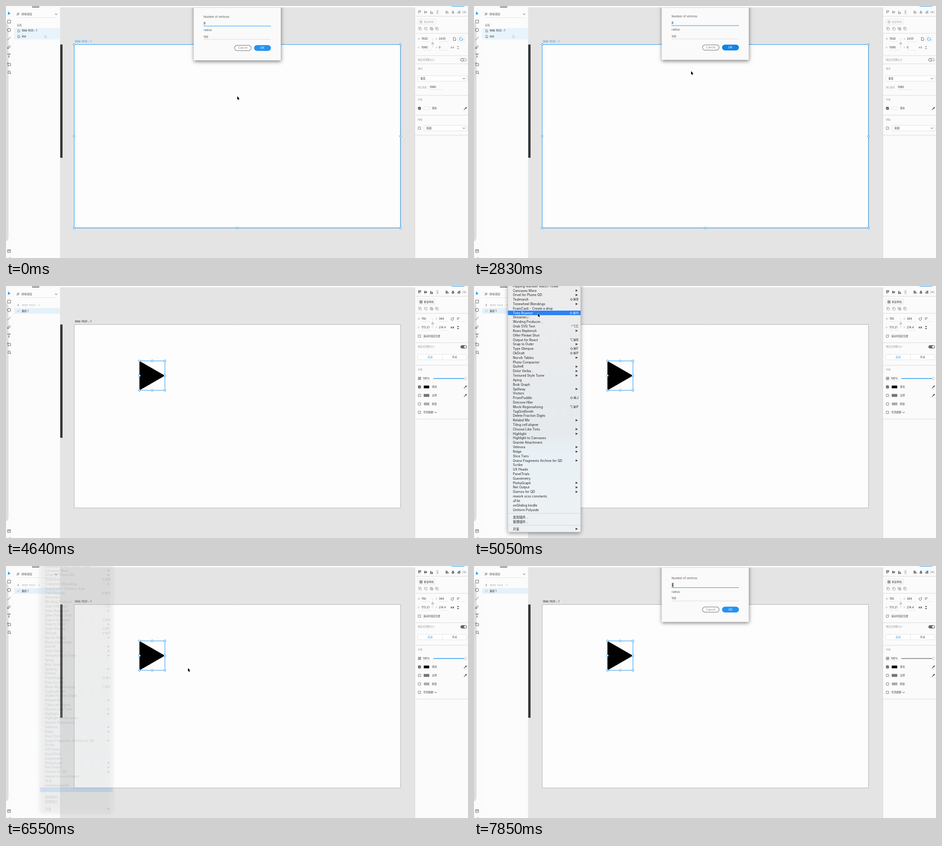
An HTML page with a canvas for the animation above (8 s loop, 1013 px wide and 553 px high).

```html
<!DOCTYPE html>
<html lang="zh">
<head>
<meta charset="utf-8">
<style>
html, body { margin: 0; width: 100%; height: 100%; background: #e4e4e4; }
canvas { display: block; width: 1013px; height: 553px; }
</style>
</head>
<body>
<canvas id="stage"></canvas>
<script>
const W = 1013, H = 553, LOOP = 8000;
const BLUE = '#2196f0', INK = '#444', SOFT = '#999', RULE = '#d6d6d6';
const FONT = 'Inter, "Noto Sans CJK SC", "Noto Sans CJK", "DejaVu Sans", sans-serif';
const canvas = document.getElementById('stage');
const ratio = window.devicePixelRatio || 1;
canvas.width = W * ratio;
canvas.height = H * ratio;
const ctx = canvas.getContext('2d');

// Artboard placement: document units to stage pixels
const BOARD = { x: 149.5, y: 84.5, w: 715.5, h: 402.5 };
const SCALE = BOARD.w / 1920;

// Each moment changes only the listed properties, as a hard cut
const MOMENTS = [
  [0, { shape: null, selected: false, drag: false, dialog: -3.5, pressed: false, tint: '#c9cdd0',
        menu: 0, row: -1, cursor: [507, 198], beam: false, slider: BLUE }],
  [180, { dialog: 0, cursor: [519, 188] }],
  [470, { cursor: [508, 165] }],
  [660, { cursor: [484, 120] }],
  [850, { cursor: [465, 90] }],
  [1040, { cursor: [460, 80] }],
  [1940, { cursor: [475, 85], tint: '#b5d8f7' }],
  [2120, { cursor: [520, 91] }],
  [2300, { cursor: [560, 93] }],
  [2470, { cursor: [562, 93], pressed: true }],
  [2650, { cursor: [530, 112] }],
  [2830, { cursor: [476, 143], dialog: -4.5 }],
  [3000, { cursor: [440, 148], dialog: -70 }],
  [3190, { cursor: [360, 146], dialog: null, shape: [50, 13.4] }],
  [3390, { cursor: [280, 138] }],
  [3590, { cursor: [225, 130] }],
  [3780, { cursor: [204, 127] }],
  [3950, { selected: true }],
  [4130, { cursor: [328, 202], shape: [384, 214.4], drag: true }],
  [4430, { cursor: [136, 6], drag: false }],
  [4640, { cursor: null }],
  [5050, { menu: 1, cursor: [140, 60], row: 6 }],
  [5240, { cursor: [150, 210], row: 22 }],
  [5430, { cursor: [158, 370], row: 38 }],
  [5640, { cursor: [163, 505], row: 51 }],
  [5830, { cursor: [164, 497] }],
  [6010, { cursor: [164, 490], row: 50 }],
  [6370, { cursor: [190, 452] }],
  [6550, { menu: .16, cursor: [399, 224] }],
  [6750, { menu: 0, cursor: [425, 180] }],
  [6990, { dialog: -3.5, pressed: false, tint: '#c9cdd0', cursor: [433, 140] }],
  [7290, { dialog: 0, slider: '#777', cursor: [436, 100] }],
  [7480, { cursor: [437, 70] }],
  [7660, { cursor: [436, 46], beam: true }],
  [7850, { cursor: [436, 41.5] }],
];

// "name|shortcut"; > marks a submenu
const MENU = `Flipping Number Watch Ticker
Canvases More|>
Orvel for Plume QD|>
Tealmarsh|⇧⌘B
Tonewheel Blendings|>
FoamCask - Create a drop
Tints Roamer|⇧⌘H
Streamer
Wording Producer...
Grab SVG Text|^⌥C
Rows Replenish|>
Offer Plinket Shot
Output for React|⌥⌘R
Snap to Outer|>
Type Glimpse|⇧⌘F
OkDraft|⇧⌘P
Norvik Tables|>
Photo Compactor
Quilm6|>
Dolor Verba...|>
Textured Style Tuner|>
Aping
Brok Graph
Spillway|>
Visitors
PrismPuddle|⇧⌘J
Dotcove filler
Mock-Regionalizing|⌥⌘P
TagGridSmith
Delete Fraction Digits
Relabel Me|>
Tiling cell aligner
Choose Like Tints|>
Highlight|>
Highlight to Canvases
Granite Attachment
Velmora|>
Ridge|>
Slice Tiers
Grano Fragments Archive for QD|>
Scribe
UX Heads
PanelTrials
Guestmetry
PlottaGraph|>
Net Output|>
Gizmos for QD|>
rework scss constants
uFile
onGliding kindle
Uniform Polyside
发现插件...
管理插件...
开发|>`.split('\n').map(s => s.split('|'));

function text(s, x, y, size = 5.8, color = INK, align = 'left') {
  ctx.font = `${size}px ${FONT}`;
  ctx.textAlign = align;
  ctx.fillStyle = color;
  ctx.fillText(s, x, y + size * .36);
}
function line(pts, color = INK, width = .8) {
  ctx.beginPath();
  for (let i = 0; i < pts.length; i += 2) ctx.lineTo(pts[i], pts[i + 1]);
  ctx.strokeStyle = color;
  ctx.lineWidth = width;
  ctx.stroke();
}
function poly(pts, color) {
  ctx.beginPath();
  for (let i = 0; i < pts.length; i += 2) ctx.lineTo(pts[i], pts[i + 1]);
  ctx.closePath();
  ctx.fillStyle = color;
  ctx.fill();
}
function box(x, y, w, h, fill, stroke, r = 0, width = .8) {
  ctx.beginPath();
  ctx.roundRect(x, y, w, h, r);
  if (fill) { ctx.fillStyle = fill; ctx.fill(); }
  if (stroke) { ctx.strokeStyle = stroke; ctx.lineWidth = width; ctx.stroke(); }
}
function circle(x, y, r, fill, stroke, width = .9) {
  box(x - r, y - r, 2 * r, 2 * r, fill, stroke, r, width);
}
function shadowed(blur, dy, color, draw) {
  ctx.save();
  ctx.shadowBlur = blur * ratio;
  ctx.shadowOffsetY = dy * ratio;
  ctx.shadowColor = color;
  draw();
  ctx.restore();
}
const chevron = (x, y) => line([x - 2.5, y - 1.2, x, y + 1.3, x + 2.5, y - 1.2], INK, 1);
const rule = (x1, x2, y, color = '#ddd') => line([x1, y, x2, y], color, .7);

function handles(x, y, w, h) {
  box(x, y, w, h, null, BLUE, 0, 1);
  for (let i = 0; i < 9; i++)
    if (i !== 4) circle(x + (i % 3) * w / 2, y + Math.floor(i / 3) * h / 2, 2.1, '#fff', BLUE, 1);
}

function toolbar() {
  box(0, 0, 18, H, '#fbfbfb');
  box(-12, 36, 17.5, 481, '#dedede', null, 9);
  poly([4.5, 11.5, 4.5, 20, 6.6, 18, 9.8, 17.5], BLUE);
  box(3.3, 31, 6.8, 6.4, null, INK);
  circle(6.7, 52.7, 3.6, null, INK);
  line([3, 75, 10.2, 67.8]);
  line([3.3, 93.5, 4.3, 89.5, 7.5, 86.5, 9.8, 89, 7, 92.2, 3.3, 93.5, 6.3, 90.4]);
  line([3.5, 106.5, 3.5, 105, 9.8, 105, 9.8, 106.5]);
  line([6.6, 105, 6.6, 112, 5.3, 112, 8, 112]);
  box(4.3, 126, 5.8, 5.2, null, INK);
  line([4.3, 123.5, 4.3, 126, 2.5, 126]);
  circle(7, 145.3, 2.7, null, INK);
  line([9, 147.3, 11, 149.6], INK, 1);
  box(3.3, 534.5, 6.6, 6.4, null, INK);
  line([4.7, 537, 8.5, 537], INK, 1.2);
  box(7, 552, 3, 1, '#888');
}

function layers(s) {
  box(18, 0, 100.5, H, '#fcfcfc');
  line([17.5, 0, 17.5, H], RULE, 1);
  circle(26.6, 17.3, 2, null, INK);
  line([25.2, 18.8, 23.4, 20.7]);
  text('所有项目', 34, 18);
  chevron(110, 18);
  rule(24, 113, 25.5);
  if (s.selected) {
    line([28, 39.6, 25.8, 42, 28, 44.4], INK, .9);
    ctx.letterSpacing = '.65px';
    text('WEB 1920 – 1', 35, 42, 5, SOFT);
    ctx.letterSpacing = '0px';
    box(18, 48.5, 100, 12.3, '#e4f1f9');
    line([25, 57, 25.5, 54.5, 28, 52.3, 30, 54.3, 27.5, 56.5, 25, 57], '#aaa', .7);
    text('路径 1', 34.5, 54.6, 5.5, '#333');
    return;
  }
  text('画板', 24, 42, 5.4, '#777');
  box(18, 48.5, 100, 25, '#e8f4fb');
  [['Web 1920 – 1', 54.5], ['test', 67]].forEach(([name, y]) => {
    line([26, y - 2.6, 28.6, y - 2.6, 30, y - 1, 30, y + 2.6, 26, y + 2.6, 26, y - 2.6], INK, .7);
    text(name, 34.5, y, 5.5, '#222');
  });
  line([86.8, 64.8, 84.7, 64.8, 84.7, 69.3, 89, 69.3, 89, 67.5], '#aaa', .6);
  line([86.5, 67, 89, 64.6, 87.4, 64.6], '#aaa', .6);
}

// mode 0..2: start, middle, end; 3: distribute
function alignIcon(x, mode, turned, color) {
  ctx.save();
  ctx.translate(x, 13.5);
  if (turned) ctx.rotate(-Math.PI / 2);
  if (mode === 3) {
    line([-3, -3.4, 3, -3.4], color);
    line([-3, 3.4, 3, 3.4], color);
    box(-1.5, -1.5, 3, 3, color);
  } else {
    const edge = (mode - 1) * 3.4;
    line([-3.4, edge, 3.4, edge], color);
    [[-2.5, 6], [.7, 4]].forEach(([left, size]) =>
      box(left, edge - size * mode / 2, 1.8, size, color));
  }
  ctx.restore();
}
function checkbox(y, on) {
  box(903.9, y - 2.7, 5.4, 5.4, on ? '#555' : '#fff', '#555', .8, .8);
  if (on) line([905, y, 906.3, y + 1.4, 908.4, y - 1.4], '#fff', .9);
}
function dropper(y) {
  line([1004, y + 3.2, 1008, y - .8], INK, 1.1);
  line([1006.5, y - 2, 1009.3, y + .8], INK, 1);
  line([1008, y - .8, 1010, y - 2.8], INK, 2);
}
function checker(x, y, cols, rows, size) {
  box(x, y, cols * size, rows * size, '#ddd');
  for (let i = 0; i < cols * rows; i++) {
    const c = i % cols, r = Math.floor(i / cols);
    if ((c + r) % 2) box(x + c * size, y + r * size, size, size, '#777');
  }
}
function dropdown(x, y, label) {
  box(x, y - 6, 1010.5 - x, 12, '#fff', '#d8d8d8', 1);
  text(label, x + 5.5, y, 5.6);
  chevron(1004, y);
}
function toggle(y, on) {
  box(996.8, y - 3.2, 13.4, 6.4, on ? '#666' : '#e6e6e6', on ? '#666' : '#aaa', 3.2);
  circle(on ? 1007 : 1000, y, 3, '#fff', '#555');
}

function inspector(s) {
  box(896.5, 0, 117, H, '#fbfbfb');
  line([896.5, 3.5, 896.5, H], '#d8d8d8', 1);
  const active = s.selected ? INK : SOFT;
  [907, 920, 933, 946].forEach((x, i) => alignIcon(x, i, false, i < 3 ? active : '#aaa'));
  [968, 980, 992, 1005].forEach((x, i) => alignIcon(x, i, true, i < 3 ? active : '#aaa'));
  const ruleYs = s.selected ? [124.5, 174, 292] : [109, 127, 196, 239.5, 283.5];
  [22.5, 60, ...ruleYs].forEach(y => line([897, y, W, y], RULE, .9));

  const repeat = s.selected ? INK : '#b0b0b0';
  box(903, 28.5, 38, 12.5, '#fdfdfd', '#dcdcdc', 1.5);
  [0, 1, 2, 3].forEach(i => box(907 + i % 2 * 3.4, 32 + (i >> 1) * 3.4, 2.4, 2.4, null, repeat, .5, .8));
  text('重复网格', 916, 35, 5.5, repeat);
  [908, 920.7, 933, 945].forEach((x, i) => {
    box(x - 3.2, 46.6, 4.6, 4.6, i === 1 ? null : '#e6e6e6', SOFT, 0, .7);
    box(x - 1.2, 48.6, 4.4, 4.4, i === 2 ? '#ccc' : '#fbfbfb', SOFT, 0, .7);
  });

  const [sx, sy] = s.selected ? s.shape : [2435, 0];
  [['W', s.selected ? 150 : 1920, 'X', sx, 72], ['H', s.selected ? 173.21 : 1080, 'Y', sy, 91]]
    .forEach(([a, size, b, pos, y]) => {
      text(a, 903, y, 4.7, SOFT);
      text(size, 911, y, 6, '#333');
      rule(911, 932, y + 6);
      text(b, 942, y, 4.7, SOFT);
      text(pos, 949, y, 6, '#333');
      rule(949, 970, y + 6);
    });
  line([933.5, 72, 935.6, 72, 935.6, 77], '#ccc', .6);
  line([933.5, 91, 935.6, 91, 935.6, 86], '#ccc', .6);
  box(933.8, 81.5, 3.6, 2.8, null, '#888', 0, .7);
  line([934.5, 81.5, 934.5, 79.8, 936.6, 79.8, 936.6, 81], '#888', .6);
  poly([975.5, 88.5, 978, 91, 975.5, 93.5], active);
  poly([982, 88.5, 979.5, 91, 982, 93.5], active);
  line([978.8, 88, 978.8, 94], active, .6);
  poly([988.7, 88, 993.5, 88, 991.1, 90.5], active);
  poly([988.7, 94.2, 993.5, 94.2, 991.1, 91.7], active);

  if (s.selected) shapeInspector(s);
  else boardInspector();
}

function boardInspector() {
  line([981, 69, 984, 69, 986, 71, 986, 75.5, 981, 75.5, 981, 69], INK);
  box(991, 66, 14, 12.5, '#fff', '#ddd', 1.5);
  line([994.5, 69.8, 999.5, 69.8, 1001.5, 71.8, 1001.5, 75, 994.5, 75, 994.5, 69.8], BLUE, 1);
  text('响应式调整大小', 903, 118, 5.2, SOFT);
  toggle(118, false);
  text('滚动', 903, 137.5, 5.1, SOFT);
  dropdown(903, 159, '垂直');
  text('视口高度', 903, 178, 4.9, SOFT);
  text('1080', 929, 178, 6, '#333');
  rule(929, 960, 183.5);
  text('外观', 903, 205, 5.1, SOFT);
  checkbox(224.5, true);
  box(916, 221.5, 12, 6, '#fff', '#ddd');
  text('填充', 934, 224.5, 5.3);
  dropper(225);
  text('网格', 903, 249, 5.1, SOFT);
  checkbox(268, false);
  dropdown(916.5, 268, '版面');
}

function shapeInspector(s) {
  ctx.beginPath();
  ctx.arc(978.6, 72.5, 2.8, -.3, 5);
  ctx.strokeStyle = INK;
  ctx.lineWidth = .8;
  ctx.stroke();
  poly([979.3, 70.8, 982, 70.8, 982, 68.5], INK);
  text('0°', 988.5, 72, 6, '#333');
  rule(988.5, 1008, 78);
  checkbox(110, false);
  text('滚动时固定位置', 915, 110, 5.3);
  text('响应式调整大小', 903, 133.5, 5.2, SOFT);
  toggle(133.5, true);
  box(903, 150, 107.5, 12, '#fff', '#dcdcdc', 1);
  line([957, 150, 957, 162], '#dcdcdc');
  text('自动', 930, 156, 5.4, BLUE, 'center');
  text('手动', 983.5, 156, 5.4, INK, 'center');
  text('外观', 903, 183.5, 5.1, SOFT);
  checker(904, 200, 4, 4, 1.4);
  box(903.8, 199.8, 6, 6, null, '#777', 0, .6);
  text('100%', 914, 203, 5.9, '#333');
  rule(914, 930, 208.5);
  line([937, 203, 1006, 203], s.slider, 1.4);
  circle(1007, 203, 2.8, '#fff', '#bbb');
  ['填充', '边界', '阴影', '背景模糊'].forEach((label, i) => {
    const y = 221.5 + i * 18.6;
    checkbox(y, i === 0);
    text(label, i < 3 ? 934 : 915, y, 5.4);
    if (i < 2) {
      box(916, y - 3, 12, 6, i ? '#737373' : '#000', '#999', 0, .6);
      dropper(y);
    }
  });
  checker(916, 255.7, 6, 3, 2);
  chevron(942, 277.3);
}

function workspace(s) {
  box(0, 0, W, H, '#e4e4e4');
  box(118.8, 84.5, 5.2, 248.5, '#363636');
  const { x, y, w, h } = BOARD;
  box(x, y, w, h, '#fdfdfd', '#aaa', 0, .9);
  text('Web 1920 – 1', 151, 78, 5.9, s.selected ? '#222' : BLUE);
  if (s.shape) {
    const left = x + s.shape[0] * SCALE, top = y + s.shape[1] * SCALE;
    const sw = 150 * SCALE, sh = 173.21 * SCALE;
    const tri = [left, top, left + sw, top + sh / 2, left, top + sh];
    poly(tri, '#000');
    if (!s.selected) line([...tri, left, top], BLUE, .9);
    else if (s.drag) box(left, top, sw, sh, null, BLUE, 0, 1);
    else handles(left, top, sw, sh);
  }
  if (!s.selected) handles(x, y, w, h);
}

function topEdge() {
  box(0, 0, W, 3.5, '#fbfbfb');
  line([118, 3.5, 896, 3.5], '#d9d9d9', .6);
  box(57, 1.5, 16, 1.5, '#444');
  box(975, -8, 32, 9, BLUE, null, 4);
}

function dialog(s) {
  ctx.save();
  ctx.beginPath();
  ctx.rect(0, 3.5, W, H);
  ctx.clip();
  ctx.translate(0, s.dialog);
  shadowed(8, 2.5, 'rgba(0,0,0,.5)', () => box(411.5, -20, 191, 142.7, '#fafafa'));
  text('Number of vertices', 433.3, 27, 6.2, '#555');
  box(433, 38.2, 4.4, 6.6, s.tint);
  text('3', 433.3, 41.5, 6);
  line([433, 47.5, 581, 47.5], BLUE, 1);
  text('radius', 433.3, 56.5, 6.2, '#555');
  text('100', 433.3, 71, 6);
  line([433, 76.8, 581, 76.8], '#d5d5d5', .8);
  box(501, 89.8, 36.5, 11.6, '#fdfdfd', '#888', 5.8, 1.2);
  text('Cancel', 519.2, 95.6, 6.1, '#888', 'center');
  box(543.8, 89.3, 37.2, 12.6, s.pressed ? '#1583e3' : '#2593f2', null, 6.3);
  ctx.lineWidth = 1;
  text('OK', 562.3, 95.6, 6.2, '#fff', 'center');
  ctx.restore();
}

function menuRowY(i) {
  return i <= 50 ? .2 + i * 9.816 : [507, 517, 533][i - 51];
}
function menu(s) {
  ctx.save();
  ctx.globalAlpha = s.menu;
  const fill = ctx.createLinearGradient(0, 0, 0, 540);
  fill.addColorStop(0, '#ececed');
  fill.addColorStop(.6, '#e6eaed');
  fill.addColorStop(.68, '#e9f1f6');
  fill.addColorStop(1, '#eef1f3');
  shadowed(10, 3, 'rgba(0,0,0,.4)', () => box(74.3, -10, 159.5, 550, fill, null, 3));
  box(74.3, -10, 159.5, 550, null, '#c4c4c4', 3, .6);
  [499, 525].forEach(y => line([74.5, y, 233.5, y], '#d2d4d6', 1));
  MENU.forEach(([name, key], i) => {
    const y = menuRowY(i), lit = i === s.row, color = lit ? '#fff' : '#222';
    if (lit) box(74.3, y - 5, 159.5, 10, '#2b82f6');
    text(name, 85.2, y, 7.05, color);
    if (key === '>') poly([222.8, y - 2.5, 227.8, y, 222.8, y + 2.5], lit ? '#fff' : '#444');
    else if (key) text(key, 229, y, 7.2, color, 'right');
  });
  const y = menuRowY(7);
  poly([115, y + 3.5, 117, y - 1.5, 120, y + 1.8], '#e8b13a');
  ['#e25a5a', '#4f9be0', '#5bb56a', '#c265c9'].forEach((c, i) =>
    circle(118 + i * 1.6, y - 3 + (i * 1.7) % 4, .6, c));
  ctx.restore();
}

function pointer(s) {
  ctx.save();
  ctx.translate(...s.cursor);
  if (s.beam) {
    const shape = [-1.8, -4, 0, -3.2, 0, 3.2, -1.8, 4];
    [['#fff', 2], ['#111', .9]].forEach(([color, width]) => {
      line(shape, color, width);
      line([1.8, -4, 0, -3.2, 0, 3.2, 1.8, 4], color, width);
    });
  } else {
    const arrow = [0, 0, 0, 7.4, 1.7, 5.9, 2.9, 8.7, 4.1, 8.2, 2.9, 5.5, 5.2, 5.4];
    line([...arrow, 0, 0], '#fff', 1.3);
    poly(arrow, '#000');
  }
  ctx.restore();
}

function stateAt(time) {
  const state = {};
  for (const [start, change] of MOMENTS) if (start <= time) Object.assign(state, change);
  return state;
}

function render(now) {
  const s = stateAt(now % LOOP);
  ctx.setTransform(ratio, 0, 0, ratio, 0, 0);
  workspace(s);
  layers(s);
  toolbar();
  inspector(s);
  topEdge();
  if (s.dialog !== null) dialog(s);
  if (s.menu) menu(s);
  if (s.cursor) pointer(s);
}

const begun = performance.now();
function tick() {
  render(performance.now() - begun);
  requestAnimationFrame(tick);
}
tick();
</script>
</body>
</html>
```
